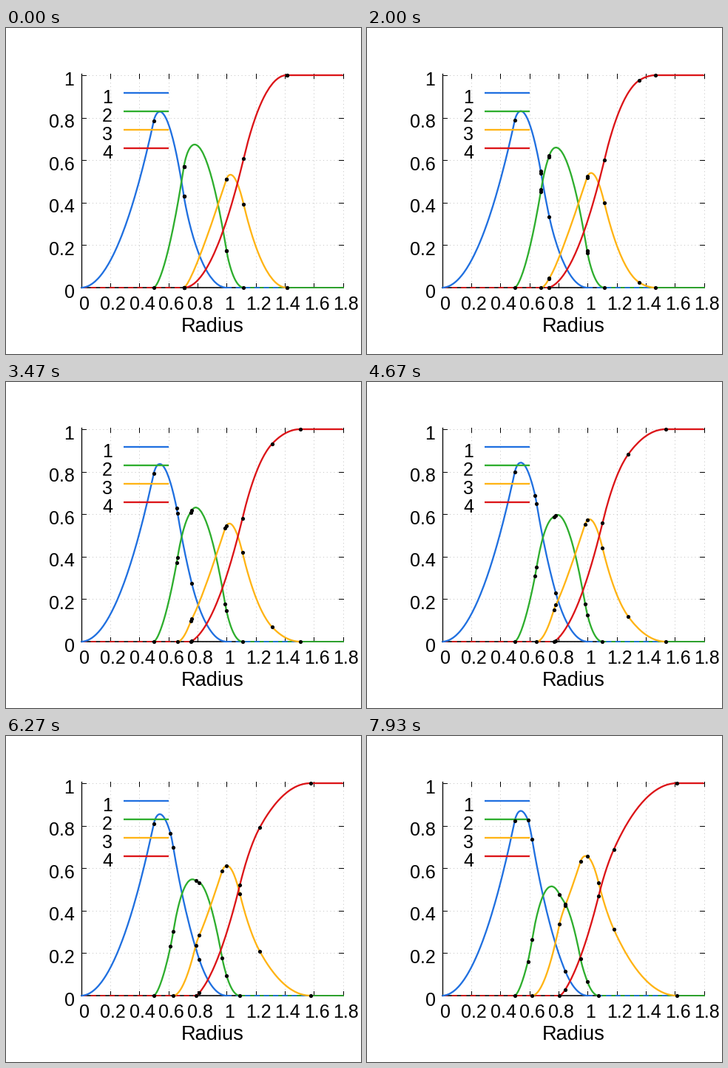
Write a matplotlib script that moves like this. It is 480 px wide and 442 px high and loops after 8 s.

```python
import numpy as np
import matplotlib.pyplot as plt
from matplotlib.animation import FuncAnimation

# Share of a unit rhombus covered by exactly k discs around its four corners,
# while the rhombus shears from a square towards the hexagonal lattice.

W, H, DPI = 480, 442, 100
FRAMES, LOOP = 120, 8000
STEP_DEG = 0.15
LEFT, RIGHT, TOP, BOTTOM = 101.5, 455.5, 64, 352
R_MAX = 1.8
COLORS = ["#2070e0", "#2eae2e", "#ffb414", "#dc1418"]
PX = 72 / DPI

plt.rcParams["font.family"] = "Liberation Sans"

fig = plt.figure(figsize=(W / DPI, H / DPI), dpi=DPI, facecolor="white")
ax = fig.add_axes([0, 0, 1, 1])
ax.set_xlim(0, W)
ax.set_ylim(H, 0)
ax.axis("off")


def px(r):
    return LEFT + np.asarray(r) * (RIGHT - LEFT) / R_MAX


def py(v):
    return BOTTOM - np.asarray(v) * (BOTTOM - TOP)


def line(x, y, color="black", width=1.0, z=1, **kw):
    return ax.plot(x, y, color=color, lw=width * PX, zorder=z, **kw)[0]


def text(x, y, s, size=25, ha="center"):
    ax.text(x, y, s, fontsize=size * PX, ha=ha, va="baseline", zorder=9)


def draw_axes():
    grid = dict(color="#cccccc", width=1, z=0, linestyle=(0, (1.2, 3.6)))
    for i in range(10):
        x = px(0.2 * i)
        line([x, x], [TOP, BOTTOM], **grid)
        line([x, x], [BOTTOM, BOTTOM - 6], z=2)
        line([x, x], [TOP - 2, TOP + 4], z=2)
        text(x + 4, 382, f"{0.2 * i:.1f}".replace(".0", ""))
    for i in range(6):
        y = py(0.2 * i)
        line([LEFT, RIGHT], [y, y], **grid)
        line([LEFT, LEFT + 6], [y, y], z=2)
        line([RIGHT - 6, RIGHT], [y, y], z=2)
        text(92.5, y + 13.5, f"{0.2 * i:.1f}".replace(".0", ""), ha="right")
    line([LEFT, LEFT], [TOP - 2, BOTTOM], width=1.3, z=2)
    line([LEFT, RIGHT], [BOTTOM, BOTTOM], width=1.6, z=2)
    text(279, 412, "Radius", size=27.3)


def draw_key():
    for k, color in enumerate(COLORS):
        y = 87.5 + 25.3 * k
        line([159, 220], [y, y], color, 2.3, 3.5 + k, solid_capstyle="butt")
        text(144, y + 14, str(k + 1), ha="right")


draw_axes()
draw_key()
dash = dict(width=1.8, linestyle=(0, (4, 3)), dash_capstyle="butt")
green_tail = line([], [], COLORS[1], 1.8, 2.5)
blue_tail = line([], [], COLORS[0], z=2.6, **dash)
red_head = line([], [], COLORS[3], z=2.7, **dash)
curves = [line([], [], c, 2.3, 3 + k, solid_capstyle="butt")
          for k, c in enumerate(COLORS)]
dots = ax.plot([], [], "o", color="black", ms=5.2 * PX, mew=0, zorder=8)[0]

# The rhombus has point symmetry, so half of it is enough.
N, BINS = 440, 450
U, V = np.meshgrid((np.arange(N) + 0.5) / N, (np.arange(N // 2) + 0.5) / N)
radii = np.linspace(0, R_MAX, BINS + 1)


def coverage(theta):
    c, s = np.cos(theta), np.sin(theta)
    x, y = U + V * c, V * s
    corners = [(0, 0), (1, 0), (c, s), (1 + c, s)]
    d = np.array([np.hypot(x - a, y - b).ravel() for a, b in corners])
    d.sort(axis=0)
    cum = np.zeros((5, BINS + 1))
    for k in range(4):
        idx = (d[k] * BINS / R_MAX).astype(int)
        count = np.bincount(idx, minlength=BINS)[:BINS]
        cum[k, 1:] = np.cumsum(count) / U.size
    return cum[:4] - cum[1:]


def update(i):
    theta = np.radians(90 - STEP_DEG * i)
    s, ch, sh = np.sin(theta), np.cos(theta / 2), np.sin(theta / 2)
    share = coverage(theta)
    edge = np.hypot(0.5, s)

    spans = [(0, 1), (0.5, edge), (0.5 / ch, 2 * ch), (ch, R_MAX)]
    for k, (a, b) in enumerate(spans):
        r = np.concatenate([[a], radii[(radii > a) & (radii < b)], [b]])
        curves[k].set_data(px(r), py(np.interp(r, radii, share[k])))

    red_head.set_data(px([0, ch]), [BOTTOM] * 2)
    green_tail.set_data(px([edge, R_MAX]), [BOTTOM] * 2)
    blue_tail.set_data(px([1, 2 * ch]), [BOTTOM] * 2)

    # radius where the geometry changes -> curves that bend there
    joints = [(0.5, (0, 1)), (sh, (0, 1)), (0.5 / ch, (0, 1, 2)),
              (ch, (1, 2, 3)), (0.5 / sh, (0, 1, 2, 3)), (s, (1, 2)),
              (1, (1, 2)), (edge, (1, 2, 3)), (2 * sh, (2, 3)),
              (2 * ch, (2, 3))]
    pts = [(r, np.interp(r, radii, share[k])) for r, ks in joints for k in ks]
    r, v = np.array(pts).T
    dots.set_data(px(r), py(v))
    return [*curves, red_head, green_tail, blue_tail, dots]


anim = FuncAnimation(fig, update, frames=FRAMES, interval=LOOP / FRAMES,
                     repeat=True, repeat_delay=0, blit=False)
plt.show()
```
